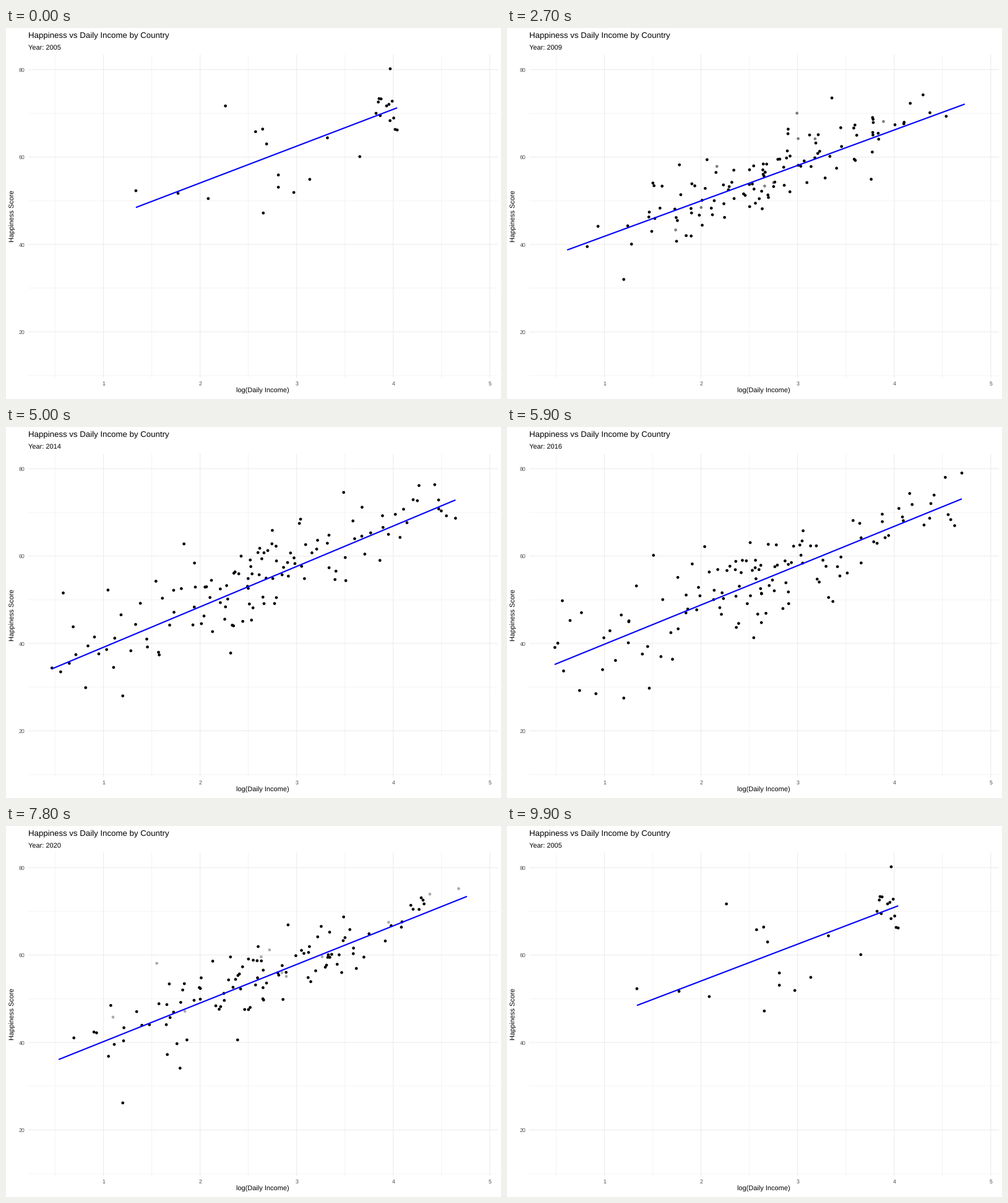
Write a matplotlib script that moves like this. It is 800 px wide and 600 px high and loops after 10 s.

```python
import numpy as np
import matplotlib.pyplot as plt
from matplotlib.animation import FuncAnimation

W, H = 800, 600
PT = 0.72  # points per pixel at 100 dpi
FRAMES, INTERVAL = 100, 100

plt.rcParams.update({
    "font.family": "Liberation Sans",
    "text.hinting": "none",
    "toolbar": "None",
})

YEARS = range(2005, 2024)
# First frame of each transition and its number of steps.
STARTS = [*range(2, 39, 6), 43, 48, *range(52, 98, 5)]
STEPS = [4] * 7 + [3] * 10 + [4, 3]

# Key years; those between are interpolated. Columns: year, countries,
# lowest and highest income, lowest score, trend at income 2.5, trend slope.
KEYS = np.array([
    (2005, 27, 1.336, 4.041, 47, 58.28, 8.43),
    (2006, 89, 0.543, 4.680, 32, 56.50, 8.50),
    (2007, 101, 0.585, 4.474, 33, 54.73, 8.56),
    (2009, 112, 0.441, 4.675, 32, 54.03, 8.11),
    (2010, 122, 0.787, 4.787, 32, 54.03, 8.11),
    (2011, 132, 0.485, 4.860, 29, 53.80, 8.40),
    (2014, 126, 0.466, 4.645, 28, 53.00, 9.25),
    (2018, 128, 0.502, 4.755, 27, 53.62, 8.73),
    (2020, 105, 0.543, 4.765, 26, 53.40, 8.85),
    (2021, 112, 0.732, 4.842, 26, 53.24, 8.90),
    (2022, 130, 0.475, 4.857, 13, 53.24, 8.90),
])

# The few countries below the wealthy cluster of the first year.
FIRST = [
    (1.336, 52.3), (1.772, 51.7), (2.085, 50.5), (2.263, 71.7),
    (2.575, 65.8), (2.648, 66.4), (2.689, 63.0), (2.655, 47.2),
    (2.811, 55.9), (2.811, 53.1), (2.971, 51.9), (3.136, 54.9),
    (3.319, 64.4), (3.654, 60.1), (3.969, 80.2), (4.041, 66.2),
]

# Lasting income and mood of each country, as standard normals.
TRAITS = np.random.default_rng(4).normal(size=(2, 140))


def key_values(year):
    return [np.interp(year, KEYS[:, 0], col) for col in KEYS[:, 1:].T]


def first_year(count):
    rng = np.random.default_rng(2005)
    cluster = rng.normal((3.86, 71.2), (0.11, 2.6), (count - len(FIRST), 2))
    cluster[:, 0] = np.clip(cluster[:, 0], 3.68, 4.02)
    return np.vstack([FIRST, cluster])


def make_year(year):
    """Scatter points of a year and the two ends of its trend line."""
    count, lo, hi, low, level, slope = key_values(year)
    n = round(count)
    ends = np.array([(x, level + slope * (x - 2.5)) for x in (lo, hi)])
    if year == YEARS[0]:
        return first_year(n), ends

    rng = np.random.default_rng(year)
    income, mood = 0.6 * TRAITS[:, :n] + 0.8 * rng.normal(size=(2, n))
    # Ranks spread the incomes over the span, thinner towards both ends.
    q = income.argsort().argsort() / (n - 1)
    q += 0.6 * np.sin(2 * np.pi * q) / (2 * np.pi)
    x = np.clip(lo + (hi - lo) * q + rng.normal(0, 0.03, n), lo, hi)
    y = level + slope * (x - 2.5) + mood * (6.8 - 0.48 * x)
    y = np.clip(y, max(low, 27) + 1, 79)
    x[0], y[0] = 1.2, low  # the unhappiest country
    return np.column_stack([x, y]), ends


POINTS, LINES = zip(*map(make_year, YEARS))


def tween(a, b, t):
    """Move rows of a to the same rows of b; unpaired rows fade."""
    n = min(len(a), len(b))
    moved = a[:n] + (b[:n] - a[:n]) * t
    extra, alpha = (b[n:], t) if len(b) > n else (a[n:], 1 - t)
    alphas = np.r_[np.ones(n), np.full(len(extra), alpha)]
    return np.vstack([moved, extra]), alphas


def state(frame):
    """Indices of the two years and the progress between them."""
    k = int(np.searchsorted(STARTS, frame, side="right")) - 1
    if k < 0:
        return 0, 0, 0.0
    t = min(1.0, (frame - STARTS[k] + 1) / STEPS[k])
    return k, (k + 1) % len(YEARS), t


# Panel edges in pixels, and the mapping from data to pixels.
LEFT, RIGHT, TOP, BOTTOM = 35.8, 794.5, 42.5, 566
X1, X_UNIT = 157.5, 156.1
Y20, Y_UNIT = 491.4, 7.067

fig = plt.figure(figsize=(W / 100, H / 100), dpi=100, facecolor="white")
ax = fig.add_axes([LEFT / W, 1 - BOTTOM / H,
                   (RIGHT - LEFT) / W, (BOTTOM - TOP) / H])
ax.set_xlim(1 + (LEFT - X1) / X_UNIT, 1 + (RIGHT - X1) / X_UNIT)
ax.set_ylim(20 + (Y20 - BOTTOM) / Y_UNIT, 20 + (Y20 - TOP) / Y_UNIT)
ax.axis("off")


def label(x, y, text, size, color="black", **kw):
    return fig.text(x / W, 1 - y / H, text, fontsize=size * PT, color=color,
                    va="baseline", **kw)


def grid(line, values, width):
    for v in values:
        line(v, color="#ebebeb", lw=width * PT, zorder=width, snap=False)


grid(ax.axvline, np.arange(0.5, 5), 0.53)
grid(ax.axhline, range(10, 71, 20), 0.53)
grid(ax.axvline, range(1, 6), 1.07)
grid(ax.axhline, range(20, 81, 20), 1.07)
for v in range(1, 6):
    label(X1 + (v - 1) * X_UNIT, 578, str(v), 8.8, "#4d4d4d", ha="center")
for v in range(20, 81, 20):
    label(30.7, Y20 - (v - 20) * Y_UNIT + 3.4, str(v), 8.8, "#4d4d4d",
          ha="right")

label(35.5, 16.3, "Happiness vs Daily Income by Country", 13.2)
subtitle = label(35.5, 35, "", 11)
label(415, 590, "log(Daily Income)", 11, ha="center")
label(13.5, 304.5, "Happiness Score", 11, ha="center", rotation=90,
      rotation_mode="anchor")

dots = ax.scatter([], [], s=(4.7 * PT) ** 2, linewidths=0, zorder=3)
trend, = ax.plot([], [], color="#0000ff", lw=2.13 * PT, zorder=4,
                 solid_capstyle="butt")


def draw(frame):
    a, b, t = state(frame)
    points, alphas = tween(POINTS[a], POINTS[b], t)
    colors = np.zeros((len(points), 4))
    colors[:, 3] = alphas
    dots.set_offsets(points)
    dots.set_facecolors(colors)
    trend.set_data(*(LINES[a] + (LINES[b] - LINES[a]) * t).T)
    subtitle.set_text(f"Year: {YEARS[b if t > 0.5 else a]}")
    return dots, trend, subtitle


anim = FuncAnimation(fig, draw, frames=FRAMES, interval=INTERVAL,
                     init_func=lambda: draw(0), repeat=True, repeat_delay=0)
plt.show()
```
